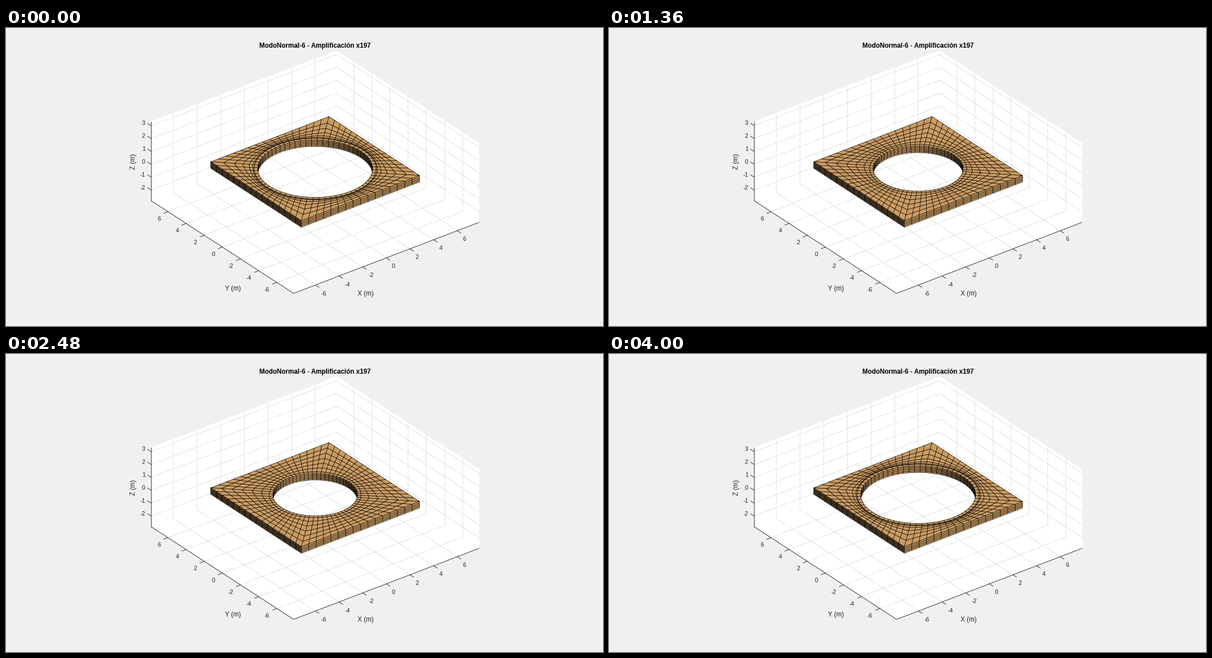
Write a matplotlib script that moves like this. It is 1058 px wide and 529 px high and loops after 4.08 s.

```python
import numpy as np
import matplotlib.pyplot as plt
from matplotlib.animation import FuncAnimation
from matplotlib.collections import LineCollection, PolyCollection

W, H, DPI = 1058, 529, 100
FRAMES, INTERVAL, CYCLES = 51, 80, 4
PX = 72 / DPI

# Orthographic view: azimuth -37.5, elevation 30
SCALE, CX, CY = 26.4, 547.4, 254.9
CA, SA = np.cos(np.radians(37.5)), np.sin(np.radians(37.5))
CE, SE = np.cos(np.radians(30)), 0.5
LIM, Z0, ZHALF = 7.85, 0.25, 3.08
ZMIN, ZMAX = Z0 - ZHALF, Z0 + ZHALF

# Plate mesh
SIDE, THICK, PER_SIDE, ROWS, LAYERS = 5.0, 0.5, 16, 6, 4
R_MEAN, R_AMP, RING = 3.35, 0.51, 0.24
TAN = np.array([203, 156, 98]) / 255
INK = (0.15, 0.15, 0.15)

plt.rcParams["font.family"] = "Liberation Sans"
fig = plt.figure(figsize=(W / DPI, H / DPI), dpi=DPI, facecolor="#f0f0f0")
ax = fig.add_axes([0, 0, 1, 1])
ax.set_xlim(-0.5, W - 0.5)
ax.set_ylim(H - 0.5, -0.5)
ax.axis("off")


def project(x, y, z):
    x, y, z = np.broadcast_arrays(x, y, z)
    u = CX + SCALE * (CA * x - SA * y)
    v = CY - SCALE * (CE * (z - Z0) + SE * (SA * x + CA * y))
    return np.stack([u, v], axis=-1)


def seg(a, b):
    return [project(*a), project(*b)]


def label(x, y, text, size=10.67, ha="center", **kw):
    kw.setdefault("color", INK)
    ax.text(x, y, text, fontsize=size * PX, ha=ha,
            va=kw.pop("va", "center_baseline"), **kw)


def draw_box():
    a, b = -LIM, LIM
    hull = [(a, a, ZMIN), (a, b, ZMIN), (a, b, ZMAX),
            (b, b, ZMAX), (b, a, ZMAX), (b, a, ZMIN)]
    ax.add_collection(PolyCollection([[project(*p) for p in hull]],
                                     facecolors="white", edgecolors="none"))
    grid, ticks = [], []
    for t in range(-6, 7, 2):
        grid += [seg((t, a, ZMIN), (t, b, ZMIN)), seg((t, b, ZMIN), (t, b, ZMAX)),
                 seg((a, t, ZMIN), (b, t, ZMIN)), seg((b, t, ZMIN), (b, t, ZMAX))]
        ticks += [seg((t, a, ZMIN), (t, a - 0.42, ZMIN)),
                  seg((a, t, ZMIN), (a - 0.38, t, ZMIN))]
        x, y = project(t, a, ZMIN)
        label(x + 10, y + 14.4, str(t), ha="left")
        x, y = project(a, t, ZMIN)
        label(x - 12.8, y + 12.2, str(t), ha="right")
    for t in range(-2, 4):
        grid += [seg((a, b, t), (b, b, t)), seg((b, b, t), (b, a, t))]
        ticks.append(seg((a, b, t), (a, b + 0.42, t)))
        x, y = project(a, b, t)
        label(x - 10.5, y - 5, str(t), ha="right")
    axes = [seg((a, b, ZMIN), (a, b, ZMAX)), seg((a, b, ZMIN), (a, a, ZMIN)),
            seg((a, a, ZMIN), (b, a, ZMIN))]
    ax.add_collection(LineCollection(grid, colors="#dfdfdf", linewidths=0.9 * PX))
    ax.add_collection(LineCollection(axes + ticks, colors=[INK], linewidths=0.9 * PX))


def quads(p):
    """Cells of a grid of projected points shaped (m, n, 2)."""
    q = np.stack([p[:-1, :-1], p[1:, :-1], p[1:, 1:], p[:-1, 1:]], axis=2)
    return q.reshape(-1, 4, 2)


def shade(nx, ny):
    """Side wall colour: light comes from the -Y side."""
    k = 0.42 + 0.58 * np.maximum(0, -np.asarray(ny, float))
    return np.multiply.outer(k, TAN)


# Matching points on the unit circle and the square outline
ang = np.linspace(-np.pi / 4, 7 * np.pi / 4, 4 * PER_SIDE + 1)
circle = np.stack([np.cos(ang), np.sin(ang)], axis=-1)
s = np.linspace(-SIDE, SIDE, PER_SIDE + 1)[:-1]
e = np.full(PER_SIDE, SIDE)
square = np.concatenate([np.stack(c, axis=-1) for c in
                         ((e, s), (-s, e), (-e, -s), (s, -e))])
square = np.vstack([square, square[:1]])
levels = np.linspace(0, THICK, LAYERS + 1)[:, None]

# Fixed outer walls facing the viewer
span = np.linspace(-SIDE, SIDE, PER_SIDE + 1)[None, :]
outer = np.concatenate([quads(project(-SIDE, span, levels)),
                        quads(project(span, -SIDE, levels))])
n_wall = PER_SIDE * LAYERS
outer_col = np.concatenate([np.tile(shade(-1, 0), (n_wall, 1)),
                            np.tile(shade(0, -1), (n_wall, 1))])

# Cells of the hole wall that face the viewer
mid = (ang[:-1] + ang[1:]) / 2
facing = np.tile(np.cos(mid) * SA + np.sin(mid) * CA > 0, LAYERS)
inner_col = np.tile(shade(-np.cos(mid), -np.sin(mid)), (LAYERS, 1))[facing]
top_col = np.tile(TAN, (4 * PER_SIDE * (ROWS + 1), 1))

draw_box()
label(547.3, 30.5, "ModoNormal-6 - Amplificación x197", 11.67, color="black",
      weight="bold")
label(636.5, 470.3, "X (m)", 11.67)
label(402, 461, "Y (m)", 11.67)
label(226, 236.3, "Z (m)", 11.67, rotation=90, va="center")

# Neighbouring cells stroke each shared edge twice, so the stroke is thin
plate = PolyCollection([], edgecolors="black", linewidths=0.65 * PX,
                       facecolors=np.concatenate([inner_col, top_col, outer_col]),
                       joinstyle="round", zorder=3)
ax.add_collection(plate)


def update(i):
    c = np.cos(2 * np.pi * CYCLES * i / (FRAMES - 1))
    r = R_MEAN + R_AMP * c
    hole, rim = r * circle, (r + RING) * circle
    # Rows crowd against the rim as the hole widens
    t = np.linspace(0, 1, ROWS + 1)[:, None, None] ** (1.5 + 0.4 * c)
    rows = np.concatenate([hole[None], rim + t * (square - rim)])
    top = quads(project(rows[..., 0], rows[..., 1], THICK))
    wall = quads(project(hole[None, :, 0], hole[None, :, 1], levels))[facing]
    plate.set_verts(np.concatenate([wall, top, outer]))
    return [plate]


anim = FuncAnimation(fig, update, frames=FRAMES, interval=INTERVAL,
                     repeat=True, repeat_delay=0, blit=False)
plt.show()
```
